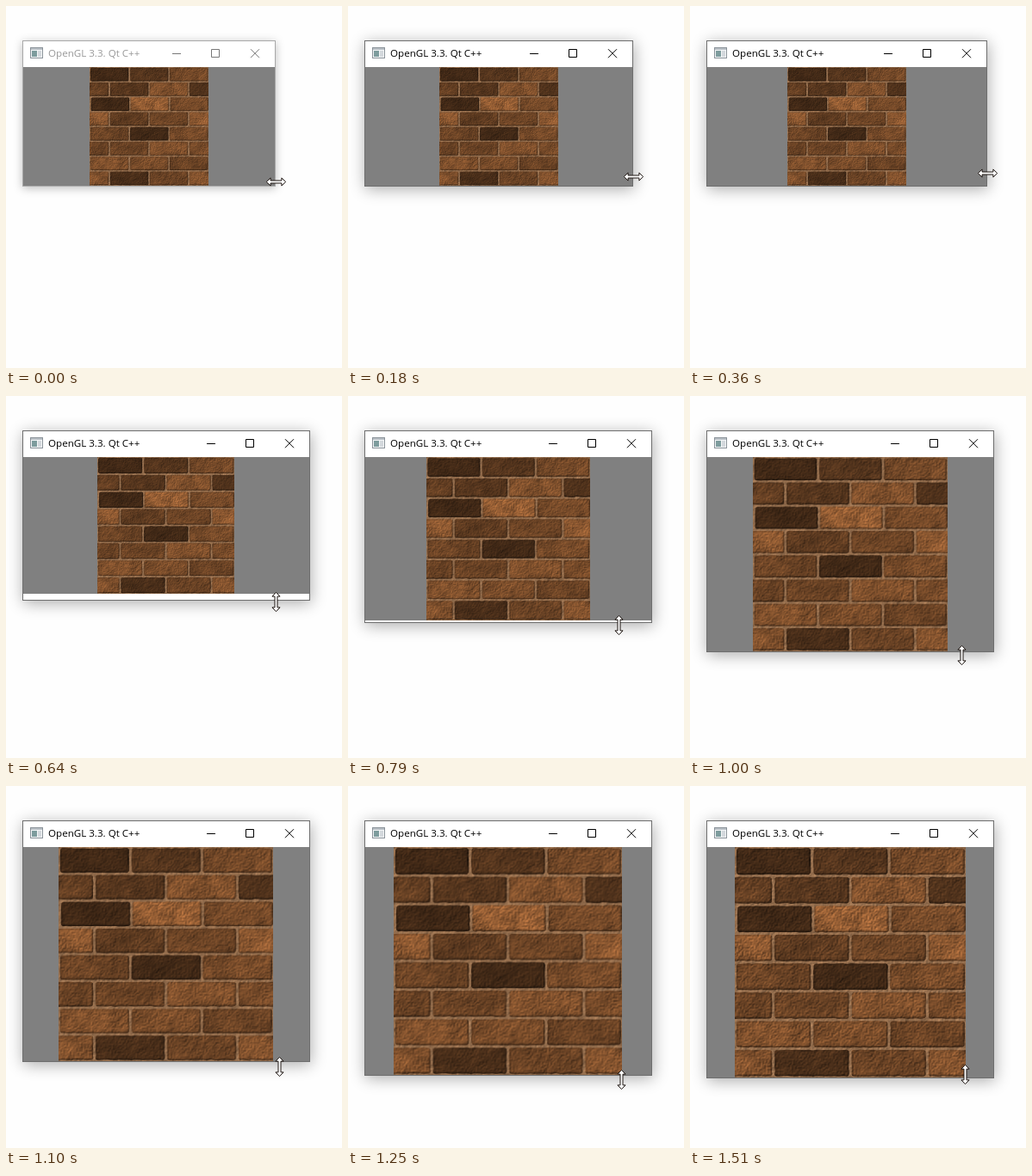
Write an HTML page with a canvas that moves like this. It is 390 by 421 pixels and loops after 1.56 s.

```html
<!DOCTYPE html>
<html lang="en">
<head>
<meta charset="utf-8">
<title>Resizing a window</title>
<style>
  html, body { margin: 0; width: 100%; height: 100%; overflow: hidden; background: #fefefe; }
  #stage { position: relative; width: 390px; height: 421px; overflow: hidden; }
  #win {
    position: absolute; left: 19px; top: 40px; box-sizing: border-box;
    border: 1px solid #6e6e6e; background: #fff; color: #000;
    box-shadow: 1px 3px 17px rgba(0, 0, 0, .33);
  }
  #win.idle { border-color: #a8a8a8; color: #999; box-shadow: 0 2px 10px rgba(0, 0, 0, .26); }
  #icon { position: absolute; left: 8px; top: 7px; }
  #title {
    position: absolute; left: 29px; top: 6px; white-space: pre;
    font: 11.6px/16px "Open Sans", "Noto Sans", sans-serif;
  }
  #buttons { position: absolute; right: 17px; top: 9px; fill: none; stroke: #000; }
  .idle #buttons { stroke: #777; }
  #view { position: absolute; left: 0; right: 0; top: 30px; background: #808080; overflow: hidden; }
  #wall { position: absolute; top: 0; }
  #cursor { position: absolute; left: 0; top: 0; overflow: visible; fill: #fff; stroke: #1c1410; }
</style>
</head>
<body>
<div id="stage">
  <div id="win">
    <svg id="icon" width="16" height="14">
      <rect x=".5" y=".5" width="14" height="12" fill="#f4f6f7" stroke="#8b939a"/>
      <rect x="1" y="1" width="13" height="2" fill="#b9c0c6"/>
      <rect x="2" y="4" width="6" height="7" fill="#7d9c9d"/>
      <rect x="9" y="4" width="4" height="7" fill="#d3d8dc"/>
    </svg>
    <div id="title">OpenGL 3.3. Qt C++</div>
    <svg id="buttons" width="102" height="12">
      <path d="M0 5.5H10M45.5 .5H54.5V9.5H45.5ZM91 .2L101 10.2M101 .2L91 10.2"/>
    </svg>
    <div id="view"><canvas id="wall" width="268" height="268"></canvas></div>
  </div>
  <svg id="cursor" width="1" height="1">
    <path d="M-11.2 0L-6.4 -4.6V-1.5H6.4V-4.6L11.2 0L6.4 4.6V1.5H-6.4V4.6Z"/>
  </svg>
</div>
<script>
const LOOP = 1560, STEP = 46, FIRST = 42;
const TURN = 594;   // the pointer moves from the right edge to the bottom one
const LEFT = 20, TOP = 71;

// Key points of each drag: [time, value]
const rightKeys = [[0, 312], [318, 344], [456, 344], [548, 352]];
const bottomKeys = [[548, 209], [640, 237], [870, 281], [1100, 320], [1238, 336], [1330, 341], [1468, 339]];
const gripX = [[640, 313], [870, 314], [1100, 317], [1238, 317], [1468, 319]];
const gripY = [[640, 2], [870, 3], [1100, 6], [1330, 4], [1468, -4]];

// Brick brightness, one digit per brick, one word per row
const tones = '136 4372 196 8458 516 5576 765 7257'.split(' ');
const TINT = [1, .63, .35], MORTAR = [150, 111, 78];

const $ = id => document.getElementById(id);
const win = $('win'), view = $('view'), wall = $('wall');
const arrow = $('cursor').firstElementChild;
const clamp = v => Math.min(Math.max(v, 0), 1);

function hash(x, y) {
  let n = Math.imul(x, 374761393) + Math.imul(y, 668265263);
  n = Math.imul(n ^ (n >>> 13), 1274126177);
  return ((n ^ (n >>> 16)) >>> 0) / 4294967296;
}

function noise(x, y) {
  const i = Math.floor(x), j = Math.floor(y);
  const smooth = v => v * v * (3 - 2 * v);
  const u = smooth(x - i), v = smooth(y - j);
  const top = hash(i, j) * (1 - u) + hash(i + 1, j) * u;
  const low = hash(i, j + 1) * (1 - u) + hash(i + 1, j + 1) * u;
  return top * (1 - v) + low * v;
}

const relief = (x, y) => noise(x / 2, y / 2) + noise(x / 6 + 50, y / 6);

function paintWall() {
  const size = wall.width, rowH = size / 8, brickW = size / 3, radius = 3;
  const ctx = wall.getContext('2d');
  const img = ctx.createImageData(size, size);
  for (let y = 0; y < size; y++) {
    const row = Math.floor((y + .5) / rowH);
    const shift = row % 2 ? brickW / 2 : row === 2 ? -1.5 : -.3;
    for (let x = 0; x < size; x++) {
      const along = (x + .5 + shift) / brickW;
      const k = Math.min(Math.max(Math.floor(along), 0), tones[row].length - 1);
      const px = (along - k - .5) * brickW, py = y + .5 - (row + .5) * rowH;
      const qx = Math.abs(px) - brickW / 2 + radius + 1.5;
      const qy = Math.abs(py) - rowH / 2 + radius + 1.5;
      const edge = Math.hypot(Math.max(qx, 0), Math.max(qy, 0)) + Math.min(Math.max(qx, qy), 0) - radius
        + (noise(x / 5, y / 5 + 90) - .5) * .9;

      const bump = relief(x, y) - relief(x + 1, y + 1);
      const stain = .25 * (noise(x / 14, y / 14 + 30) - .5);
      const rim = clamp((edge + 3) / 3) * (qy > qx ? (py > 0 ? .5 : .12) : (px > 0 ? .45 : .2));
      const light = (1 + .42 * bump + stain) * (1 - rim);
      const brick = (54 + 10.5 * tones[row][k]) * light;

      const joint = clamp(edge + .5);
      const grit = .88 + .25 * bump + .2 * noise(x / 3, y / 3);
      const at = 4 * (y * size + x);
      TINT.forEach((tint, c) => {
        img.data[at + c] = brick * tint * (1 - joint) + MORTAR[c] * grit * joint;
      });
      img.data[at + 3] = 255;
    }
  }
  ctx.putImageData(img, 0, 0);
}

// Linear travel along key points, held at both ends
function follow(keys, t) {
  const next = keys.findIndex(key => key[0] > t);
  if (next < 0) return keys[keys.length - 1][1];
  if (next === 0) return keys[0][1];
  const [t0, a] = keys[next - 1], [t1, b] = keys[next];
  return a + (b - a) * (t - t0) / (t1 - t0);
}

function place(el, box) {
  for (const key in box) el.style[key] = box[key] + 'px';
}

function render(t) {
  const right = Math.round(follow(rightKeys, t));
  const bottom = Math.round(follow(bottomKeys, t));
  // The view repaints a little behind the window edge
  const lag = Math.min((bottom - 209) / 4, 7 * Math.exp((640 - t) / 120));
  const height = bottom - Math.round(lag) - TOP;
  const width = right - LEFT;
  const side = Math.min(width, height);

  win.className = t ? '' : 'idle';
  place(win, { width: width + 2, height: bottom - 39 });
  place(view, { height });
  place(wall, { left: Math.floor((width - side) / 2), width: side, height: side });

  const [x, y, turn] = t < TURN
    ? [right + 1, 204 - 10 * clamp((right - 312) / 32), 0]
    : [follow(gripX, t), bottom + follow(gripY, t), 90];
  arrow.setAttribute('transform',
    `translate(${Math.round(x) + .5} ${Math.round(y) + .5}) rotate(${turn})`);
}

const start = performance.now();
let shown = -1;

function frame() {
  const t = (performance.now() - start) % LOOP;
  const tick = Math.max(0, FIRST + STEP * Math.floor((t - FIRST) / STEP));
  if (tick !== shown) render(shown = tick);
  requestAnimationFrame(frame);
}

paintWall();
frame();
</script>
</body>
</html>
```
